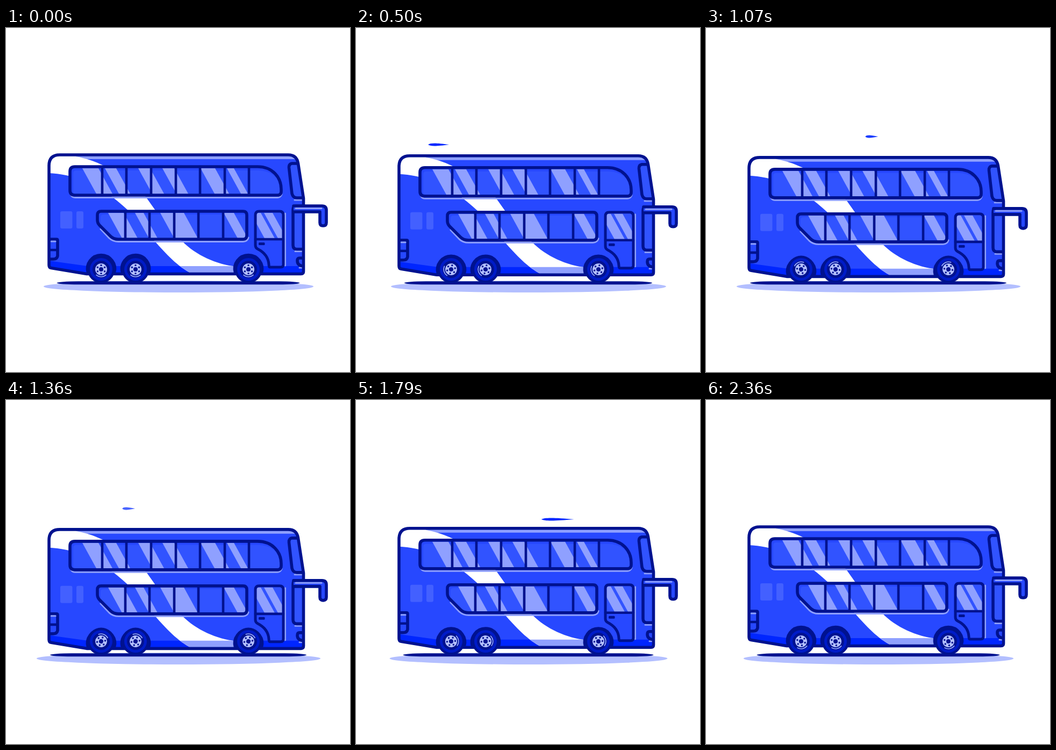
Animation of 640x640 px, one loop 2430 ms. Source, as an HTML page:

```html
<!DOCTYPE html>
<html lang="en">
<head>
<meta charset="utf-8">
<title>Bus</title>
<style>
html, body { margin: 0; width: 100%; height: 100%; overflow: hidden; background: #fff; }
svg { display: block; width: 100%; height: 100%; }
.line { fill: none; stroke: #00128f; stroke-width: 5.6; stroke-linecap: round; stroke-linejoin: round; }
.bar { stroke-width: 4.6; }
.base { fill: #2748ff; }
.deep { fill: #0026ff; }
.glass { fill: #3153ff; }
.light { fill: #8fa0ff; }
.glint { fill: none; stroke: #8fa0ff; stroke-width: 3; stroke-linecap: round; stroke-linejoin: round; }
.thin { stroke-width: 1.8; }
.navy { fill: #00128f; }
.pale { fill: #b3bfff; }
</style>
</head>
<body>
<svg viewBox="0 0 640 640">
  <defs>
    <path id="shell" d="M80 256Q80 236 100 236H525Q541 236 543.500 252L553.500 317V453Q553.500 457.500 549 457.500H150L84 446.500Q80 446 80 441Z"/>
    <path id="upper" d="M128 258H468C496 258 512 278 512 300V304Q512 311 505 311H128Q119 311 119 302V267Q119 258 128 258Z"/>
    <path id="lower" d="M177 341H441Q448 341 448 348V386Q448 393 441 393H209Q200 393 194 387L174 367Q170 363 170 357V348Q170 341 177 341Z"/>
    <path id="door" d="M471 341H509Q516 341 516 348V440Q516 445 511 445H491Q489 445 489 440C488 425 478 416 468 411Q464 409 464 404V348Q464 341 471 341Z"/>
    <path id="band" d="M80 433L152 443H556V460H150L80 449Z"/>
    <path id="stripe" d="M80 270C120 272 170 285 228 340C250 360 260 379 277 397C298 420 319 444 346 457H430V444C391 440 354 423 328 397C306 376 294 357 277 338L260 314C227 280 182 248 130 239V234H78Z"/>
    <clipPath id="inShell"><use href="#shell"/></clipPath>
    <clipPath id="inUpper"><use href="#upper"/></clipPath>
    <clipPath id="inLower"><use href="#lower"/></clipPath>
    <clipPath id="inDoor"><path d="M464 341H516V393H464Z"/></clipPath>
    <clipPath id="inBand"><use href="#band"/></clipPath>
    <path id="arch" class="deep line" d="M-24.500 11A25.500 25.500 0 1 1 24.500 11"/>
    <g id="tyre">
      <circle class="navy" r="25.500"/>
      <circle r="21" fill="#001bc8"/>
      <circle class="navy" r="16"/>
    </g>
    <g id="rim">
      <path class="glint thin" d="M-9 10.500A13.800 13.800 0 0 0 9 10.500"/>
      <circle class="pale" r="11"/>
      <circle class="navy" r="4"/>
    </g>
  </defs>

  <ellipse id="shade" class="pale" cx="321" cy="481" ry="11"/>
  <rect id="ground" class="navy" y="471.300" height="6" rx="40" ry="3"/>
  <g id="winds" class="deep"></g>

  <g id="body">
    <use href="#shell" class="base"/>
    <g clip-path="url(#inShell)">
      <path class="light" d="M100 238H545L547 250Q545 244 536 244H100Z"/>
      <use href="#band" class="deep"/>
      <use href="#stripe" fill="#fff"/>
      <g clip-path="url(#inBand)"><use href="#stripe" class="light"/></g>
    </g>
    <g fill="#4360ff">
      <rect x="101" y="341" width="22.500" height="32" rx="3"/>
      <rect x="131" y="341" width="13" height="32" rx="3"/>
    </g>

    <path class="glint" d="M121 311Q123 315.500 129 315.500H505Q511 315 513 309M176 374L192 391Q199 397.500 209 397.500H441Q449 397 451 390M519.500 345V442"/>

    <use href="#upper" class="base"/>
    <g clip-path="url(#inUpper)">
      <path class="glass" d="M125 311V270Q125 265 131 265H470Q500 266 509 290V311Z"/>
      <g id="upperShine" class="light"></g>
    </g>
    <path class="line bar" d="M179 258v53M224 258v53M270 258v53M316 258v53M361 258v53M407 258v53M452 258v53"/>
    <use href="#upper" class="line"/>

    <use href="#lower" class="base"/>
    <g clip-path="url(#inLower)">
      <path class="glass" d="M176 393V352Q176 347 182 347H446V393Z"/>
      <g id="lowerShine" class="light"></g>
    </g>
    <path class="line bar" d="M222 341v52M267 341v52M313 341v52M358 341v52M404 341v52"/>
    <use href="#lower" class="line"/>

    <use href="#door" class="base"/>
    <g clip-path="url(#inDoor)">
      <use href="#door" class="glass"/>
      <g id="doorShine" class="light"></g>
    </g>
    <path class="line bar" d="M464 393H516"/>
    <use href="#door" class="line" style="stroke-width:5"/>
    <rect class="navy" x="470" y="399" width="11.500" height="5" rx="1.500"/>

    <path class="glint" d="M537 320H551M538 415.500H551M546 446H551"/>
    <path class="glass line" d="M541 252H532Q526 253 526.500 260L532 308Q534 316 541 316H553"/>
    <path class="glass line" d="M553 331H540Q534 331 534 337V404Q534 411.500 541 411.500H553"/>
    <path class="base line" d="M553 428H546Q542 428 542 433Q542 442 553 443"/>

    <path class="base line" d="M82 393H94Q96 393 96 395V424Q95 430 88 430H82"/>
    <path class="glint" d="M84 397H92"/>
    <path class="line bar" d="M82 413H95"/>

    <use href="#shell" class="line"/>
    <path class="base line" d="M535 331H588Q596 331 596 339V362Q596 368 590 368Q584 368 584 362V342H535"/>
    <path class="glint" d="M539 335.500H587"/>
    <use href="#arch" x="177" y="444"/>
    <use href="#arch" x="241" y="444"/>
    <use href="#arch" x="451" y="444"/>
  </g>
  <g id="wheels"></g>
</svg>
<script>
const LOOP = 2430, FRAMES = 34, STEP = LOOP / FRAMES, TAU = Math.PI * 2;
const byId = id => document.getElementById(id);

// slanted reflections: [left, right] at the top edge
function shine(id, top, height, spans) {
  const lean = height * 0.55;
  byId(id).innerHTML = spans.map(([a, b]) =>
    `<path d="M${a} ${top}H${b}L${b + lean} ${top + height}H${a + lean}Z"/>`).join("");
}
shine("upperShine", 261, 50, [[142, 172], [184, 205], [246, 268], [291, 313], [362, 389], [411, 424]]);
shine("lowerShine", 344, 50, [[190, 219], [240, 256], [287, 331], [405, 424]]);
shine("doorShine", 344, 50, [[455, 474], [480, 496]]);

// rim holes
byId("rim").innerHTML += [0, 1, 2, 3, 4, 5].map(i => {
  const a = i * TAU / 6 + TAU / 12;
  return `<circle class="navy" r="1.7" cx="${7.6 * Math.cos(a)}" cy="${7.6 * Math.sin(a)}"/>`;
}).join("");
byId("wheels").innerHTML = [177, 241, 451].map(x =>
  `<g transform="translate(${x} 449)"><use href="#tyre"/><use class="spin" href="#rim"/></g>`).join("");
const rims = document.querySelectorAll(".spin");

const winds = [
  { start: 180, x: 220, y: 217, w: 39, speed: 0.268 },
  { start: 823, x: 366, y: 202, w: 24, speed: 0.28 },
  { start: 1465, x: 439, y: 222, w: 61, speed: 0.293 }
];
const LIFE = 715;
byId("winds").innerHTML = winds.map(({ w }) =>
  `<path d="M0 0C${w * 0.1} -3.4 ${w * 0.4} -3.2 ${w} 0C${w * 0.4} 3.2 ${w * 0.1} 3.4 0 0Z"/>`).join("");
const streaks = byId("winds").children;

function draw(now) {
  const t = Math.floor((now % LOOP + 3) / STEP) % FRAMES * STEP;
  const dip = (1 - Math.cos(TAU * t / LOOP)) / 2;
  const reach = 226 + 13 * dip;
  byId("body").setAttribute("transform", `translate(0 ${5 * dip})`);
  byId("shade").setAttribute("rx", 251 + 13.5 * dip);
  byId("ground").setAttribute("x", 320.5 - reach);
  byId("ground").setAttribute("width", 2 * reach);
  rims.forEach(r => r.setAttribute("transform", `rotate(${360 * t / LOOP})`));
  winds.forEach(({ start, x, y, speed }, i) => {
    const age = t - start, on = age > 0 && age < LIFE;
    streaks[i].setAttribute("opacity", on ? Math.sin(Math.PI * age / LIFE) : 0);
    streaks[i].setAttribute("transform", `translate(${x - speed * age} ${y})`);
  });
}

let begin;
function tick(now) {
  begin ??= now;
  draw(now - begin);
  requestAnimationFrame(tick);
}
draw(0);
requestAnimationFrame(tick);
</script>
</body>
</html>
```
